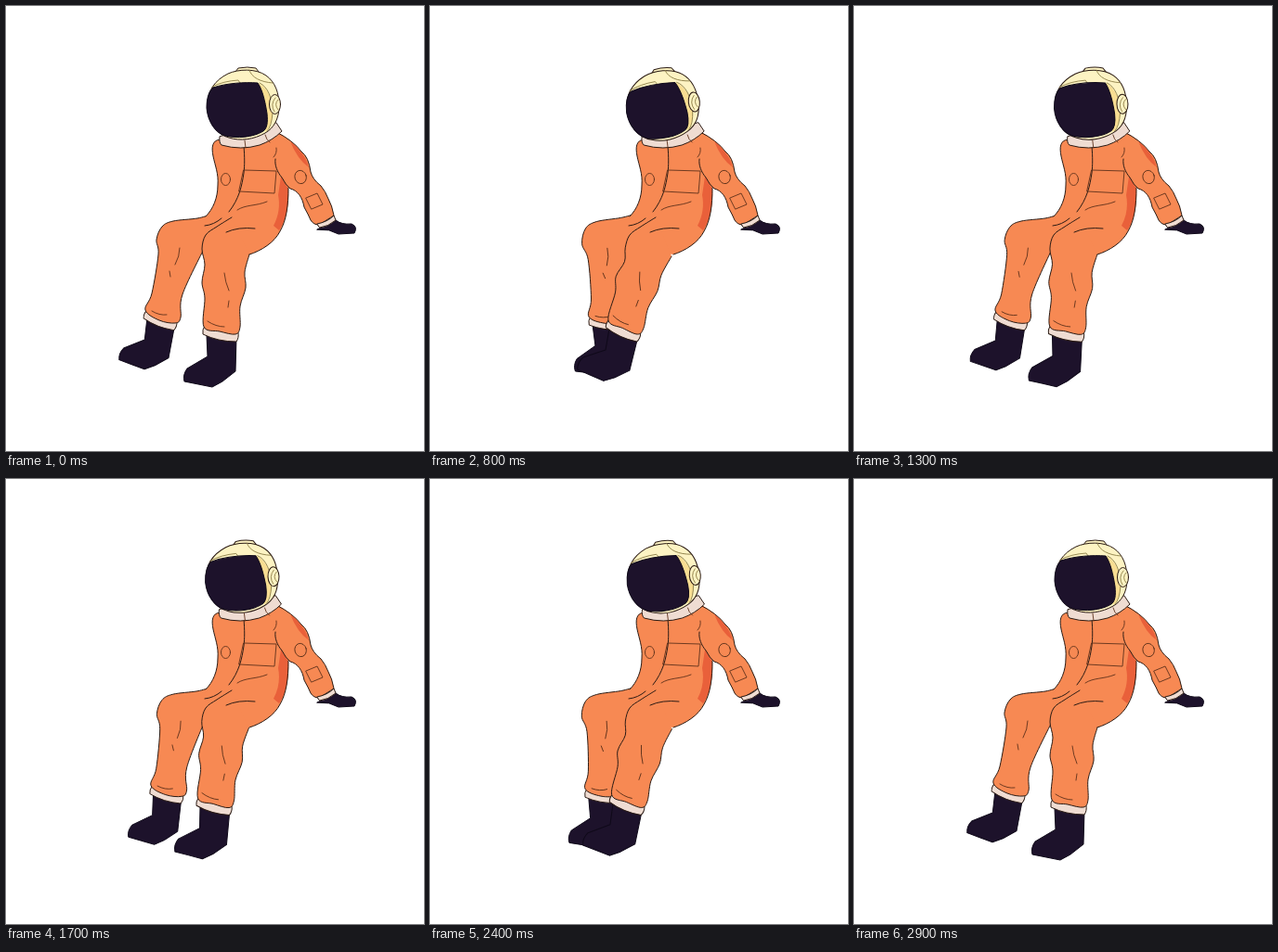
An HTML page that plays this animation: 450x480 px, repeating every 3000 ms.

```html
<!DOCTYPE html>
<html lang="en">
<head>
<meta charset="utf-8">
<title>Sitting astronaut</title>
<style>
  html, body { margin: 0; width: 100%; height: 100%; overflow: hidden; background: #fff; }
  svg { display: block; width: 100vw; height: 100vh; }
  path, ellipse { stroke: #2b1b14; stroke-width: 1; stroke-linecap: round; stroke-linejoin: round; }
  .suit { fill: #f78953; }
  .shade { fill: #e9603a; stroke: none; }
  .line { fill: none; }
  .thin { fill: none; stroke: #5f321b; stroke-width: .9; }
  .dark { fill: #1d122b; stroke: #0f0919; }
  .cuff { fill: #efdcd2; }
  .shell { fill: #fdf3c3; }
  .glow { fill: #f8dd92; stroke: none; }
  .seam { fill: none; stroke: #8d7f48; stroke-width: .9; }
</style>
</head>
<body>
<svg viewBox="0 0 450 480" preserveAspectRatio="xMidYMid meet">
  <defs>
    <g id="foot">
      <path class="dark" d="M216 355L217 378L195 391Q190 398 192 405L207 408L222 411L233 405L247 394L248 358Z"/>
      <path class="cuff" d="M214 345Q211 349 212 354Q228 362 248 362Q251 358 250 352Z"/>
    </g>
  </defs>

  <g id="left">
    <use href="#foot" class="swing" transform="translate(151 343) rotate(9) scale(.95) translate(-216 -360)"/>
    <path class="suit sleeve"/>
    <path class="thin swing" d="M187 261Q187 270 182 279M176 286L177 292M157 329Q165 334 173 333"/>
  </g>

  <path class="suit" d="M215 227C223 219 228 207 228 193C229 181 225 172 223 162C221 152 222 145 230 144L291 136L304 196C304 215 302 231 295 243C289 255 275 264 262 268L213 262" style="stroke: none"/>
  <path class="shade" d="M296 184L304 197C305 214 302 230 294 242L288 237C294 226 295 214 293 204Z"/>

  <g id="right">
    <use href="#foot" class="swing"/>
    <path class="suit sleeve"/>
    <path class="thin swing" d="M235 288Q236 298 240 307M240 318L239 325M217 340Q226 346 235 346"/>
  </g>

  <path class="line" d="M215 227C223 219 228 207 228 193C229 181 225 172 223 162C221 152 222 145 230 144M304 196C304 215 302 231 295 243C289 255 275 264 262 268"/>
  <path class="suit" style="stroke: none" d="M280 140L291 135L306 145L295 180Z"/>
  <path class="suit" d="M290 165C289 172 292 179 297 185Q301 193 306 197C314 199 319 206 321 217Q326 226 328 231Q331 236 337 236L353 226Q351 215 347 208Q344 200 339 194Q330 187 328 179Q326 163 318 157Q309 145 291 136"/>
  <path class="shade" d="M306 146Q322 158 326 174Q314 166 306 146Z"/>
  <path class="dark" d="M335 241L355 231Q361 236 372 235Q379 238 375 245L358 246L348 242Z"/>
  <path class="cuff" d="M335 235Q346 233 353 226L355 231Q347 238 338 239Z"/>

  <path class="line" d="M256 151C257 163 257 172 256 180C254 194 251 208 240 222"/>
  <path class="thin" d="M256 177L291 178L289 202L251 200ZM249 220C258 214 269 216 281 211M288 163Q292 159 291 153"/>
  <path class="line" d="M237 244Q250 238 268 240M214 237Q224 236 232 229"/>
  <ellipse class="thin" cx="236.500" cy="187" rx="5" ry="6.500"/>
  <ellipse class="thin" cx="317" cy="184.500" rx="6.200" ry="7.200" transform="rotate(-15 317 184)"/>
  <path class="thin" d="M323 207L335 202L341 214L329 219Z"/>

  <g id="collar">
    <path class="cuff" d="M230 141Q229 147 232 150Q253 156 273 150Q287 145 297 135L291 126Z"/>
    <path class="thin" d="M257 145L258 153M279 139Q280 144 284 147"/>
  </g>

  <g id="head">
    <path class="shell" d="M247 71L250 67Q260 65 269 67L272 71"/>
    <path class="shell" d="M217 106C217 91 225 80 239 73C250 68 269 67 280 75C290 82 294 94 294 108C294 122 288 132 279 137C267 144 252 146 240 142C225 138 217 124 217 106Z"/>
    <path class="glow" d="M271 83C281 87 287 100 287 116Q286 130 279 136L274 126Z"/>
    <path class="seam" d="M222 87Q234 81 250 80L252 83M262 69C264 77 274 82 287 83M273 83C282 87 287 100 287 115Q286 130 281 135"/>
    <path class="dark" d="M223 88C238 83 257 82 271 83C276 90 279 103 281 116C282 126 281 132 277 135C266 142 248 143 236 140C225 137 217 124 216 110C216 100 218 92 223 88Z"/>
    <ellipse class="shell" cx="289.500" cy="106" rx="6" ry="10.500"/>
    <path class="seam" d="M290 99Q284 106 289 114M293 101Q288 106 293 112"/>
  </g>
</svg>
<script>
const byId = id => document.getElementById(id);
const clamp = (v, lo, hi) => Math.min(hi, Math.max(lo, v));
const smooth = u => u * u * (3 - 2 * u);

// Sleeve outlines run from the hip down the front and up the back.
// "bendY" is the height at which a leg starts to follow its swing.
const legs = [
  {
    id: "left", knee: [190, 245], bendY: 223, swing: -14.8,
    sleeve: [[220, 225], [206, 229], [180, 232], [168, 238], [162, 252], [164, 268], [157, 310], [150, 328], [165, 339], [182, 342], [188, 336], [190, 311], [214, 260]]
  },
  {
    id: "right", knee: [235, 245], bendY: 253, swing: 13.2,
    sleeve: [[243, 228], [227, 238], [215, 247], [211, 262], [214, 279], [211, 298], [214, 315], [213, 346], [230, 351], [247, 354], [252, 346], [252, 324], [258, 304], [257, 287], [262, 268]]
  }
];

// Open Catmull-Rom curve through the points
function curve(pts) {
  const at = i => pts[clamp(i, 0, pts.length - 1)];
  const lean = (p, a, b) => p.map((v, k) => v + (b[k] - a[k]) / 6);
  let d = "M" + pts[0];
  for (let i = 0; i < pts.length - 1; i++) {
    const p = lean(at(i), at(i - 1), at(i + 1));
    const q = lean(at(i + 1), at(i + 2), at(i));
    d += `C${p} ${q} ${at(i + 1)}`;
  }
  return d;
}

function bend([x, y], { knee: [kx, ky], bendY }, deg) {
  const r = deg * Math.PI / 180 * clamp((y - bendY) / 40, 0, 1);
  const c = Math.cos(r), s = Math.sin(r), dx = x - kx, dy = y - ky;
  return [kx + dx * c - dy * s, ky + dx * s + dy * c];
}

for (const leg of legs) {
  const group = byId(leg.id);
  leg.outline = group.querySelector(".sleeve");
  leg.rigid = [...group.querySelectorAll(".swing")]
    .map(node => ({ node, base: node.getAttribute("transform") || "" }));
}

// Two swings, in and out, per loop
const turns = [0, 680, 1450, 2170, 2900];
function swingAt(t) {
  if (t >= 2900) return 0;
  const i = turns.findIndex((v, k) => t < turns[k + 1]);
  const u = smooth((t - turns[i]) / (turns[i + 1] - turns[i]));
  return i % 2 ? 1 - u : u;
}

function draw(t) {
  const s = swingAt(t);
  for (const leg of legs) {
    const deg = leg.swing * s;
    leg.outline.setAttribute("d", curve(leg.sleeve.map(p => bend(p, leg, deg))));
    for (const { node, base } of leg.rigid) {
      node.setAttribute("transform", `rotate(${deg} ${leg.knee}) ${base}`);
    }
  }
  byId("collar").setAttribute("transform", `translate(${-2 * s} 0)`);
  byId("head").setAttribute("transform", `rotate(${-6.2 * s} 262 156)`);
}

const start = performance.now();
function tick(now) {
  const t = Math.max(0, now - start) % 3000;
  draw(Math.floor(t / 100) * 100);
  requestAnimationFrame(tick);
}
draw(0);
requestAnimationFrame(tick);
</script>
</body>
</html>
```
